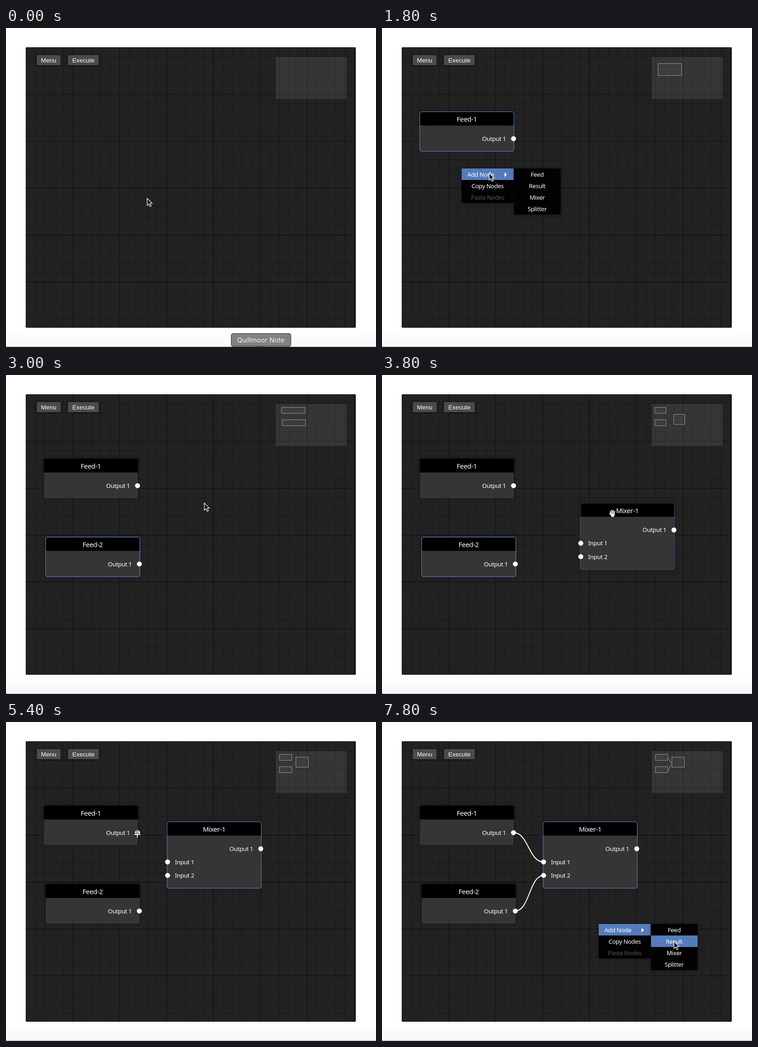
These frames come from a looping animation (806x695 px, 8 s). An HTML page with a canvas:

```html
<!DOCTYPE html>
<html lang="en">
<head>
<meta charset="utf-8">
<title>Node editor</title>
<style>
  html, body { margin: 0; width: 100%; height: 100%; overflow: hidden; background: #fff; }
  canvas { display: block; }
</style>
</head>
<body>
<canvas id="stage" width="806" height="695"></canvas>
<script>
const ctx = document.getElementById('stage').getContext('2d');
const LOOP = 8000, STEP = 200;
const UI = '"Noto Sans", "Open Sans", sans-serif';
const BLUE = '#557cba';

// Pointer position at every step
const pointer = [
  [307.5, 371], [240, 294], [174, 218], [234, 229], [335, 231], [300, 235], [256, 231], [164, 195],
  [173.5, 306], [233.5, 316], [335, 318], [256, 319], [169, 366], [230, 350], [330, 318], [432, 279],
  [492, 290], [595, 341], [595, 341], [502, 301], [465, 272], [432, 248], [421, 240], [350, 290],
  [322, 334], [304, 285], [291, 252], [286, 245], [308, 260], [335, 290], [352, 305], [345, 325],
  [310, 380], [290.5, 412], [320, 382], [352, 334], [472, 440], [472, 440], [532, 451], [636, 478]
];

// Steps at which each context menu opens, shows its submenu, reaches an item and closes
const menus = [
  { x: 174, y: 218, open: 2, sub: 3, pick: 4, close: 5, item: 0 },
  { x: 173.5, y: 306, open: 8, sub: 9, pick: 10, close: 11, item: 0 },
  { x: 432, y: 279, open: 16, sub: 16, pick: 17, close: 19, item: 2 },
  { x: 472, y: 440, open: 37, sub: 38, pick: 39, close: 40, item: 1 }
];

// Nodes appear at `from`, are dragged between `grab` and `drop`, and lose focus at `blur`
const nodes = [
  { title: 'Feed-1', from: [174.5, 218.5], to: [82.5, 182.5], born: 5, grab: 6, drop: 7, mapped: 7, blur: 12, h: 86, inputs: 0 },
  { title: 'Feed-2', from: [173.5, 306], to: [86.5, 353.2], born: 11, grab: 11, drop: 12, mapped: 13, blur: 20, h: 86, inputs: 0 },
  { title: 'Mixer-1', from: [432, 279], to: [351, 217.5], born: 19, grab: 19, drop: 22, mapped: 22, blur: 99, h: 144.5, inputs: 2 }
];
const NODE_W = 204.7;

const links = [
  { source: 0, input: 0, start: 28, end: 31 },
  { source: 1, input: 1, start: 34, end: 35 }
];

const clamp01 = v => Math.max(0, Math.min(1, v));
const outPort = ([x, y]) => [x + 204, y + 58.6];
const inPort = ([x, y], i) => [x + 1, y + 87.5 + i * 29.2];

function nodePos(node, step) {
  const raw = clamp01((step - node.grab) / (node.drop - node.grab));
  const k = raw * (2 - raw);
  return node.from.map((v, i) => v + (node.to[i] - v) * k);
}

function text(str, x, y, { size = 13.2, color = '#fff', align = 'center', family = UI, spacing = -0.4 } = {}) {
  ctx.font = `${size}px ${family}`;
  ctx.letterSpacing = `${spacing}px`;
  ctx.fillStyle = color;
  ctx.textAlign = align;
  ctx.fillText(str, x, y);
}

function box(x, y, w, h, radius, fill, stroke) {
  ctx.beginPath();
  ctx.roundRect(x, y, w, h, radius);
  if (fill) { ctx.fillStyle = fill; ctx.fill(); }
  if (stroke) { ctx.strokeStyle = stroke; ctx.stroke(); }
}

function withShadow(blur, alpha, draw) {
  ctx.save();
  ctx.shadowColor = `rgba(0,0,0,${alpha})`;
  ctx.shadowBlur = blur;
  draw();
  ctx.restore();
}

function drawBackground() {
  ctx.fillStyle = '#fff';
  ctx.fillRect(0, 0, 806, 695);
  const fade = ctx.createLinearGradient(0, 655, 0, 694);
  fade.addColorStop(0, '#fff');
  fade.addColorStop(1, '#f7f7f7');
  ctx.fillStyle = fade;
  ctx.fillRect(0, 655, 806, 39);
  ctx.fillStyle = '#a0a0a0';
  ctx.fillRect(0, 694, 806, 1);

  ctx.save();
  box(43, 42, 719, 611, 2, '#222');
  ctx.clip();
  const gap = 20.43;
  for (let k = 1; k <= 35; k++) {
    const major = k % 5 === 0;
    ctx.fillStyle = major ? '#141414' : '#181818';
    const size = major ? 1.6 : 1;
    ctx.fillRect(43.4 + k * gap - size / 2, 42, size, 611);
    ctx.fillRect(43, 42.5 + k * gap - size / 2, 719, size);
  }
  ctx.restore();
  ctx.lineWidth = 1;
  box(43.5, 42.5, 718, 610, 2, null, '#111');
}

function drawButton(label, x, w) {
  withShadow(5, 0.7, () => box(x, 59, w, 22, 3, '#4b4b4b'));
  text(label, x + w / 2, 75, { size: 13.333, family: '"Liberation Sans", Arial, sans-serif', spacing: 0 });
}

function curve(a, b) {
  const mid = (a[0] + b[0]) / 2;
  ctx.beginPath();
  ctx.moveTo(...a);
  ctx.bezierCurveTo(mid, a[1], mid, b[1], ...b);
  ctx.stroke();
}

function drawMinimap(step) {
  ctx.fillStyle = 'rgba(255,255,255,.09)';
  ctx.fillRect(588, 63, 154, 91.5);
  const shown = nodes.filter(n => step >= n.born)
    .map(n => ({ h: n.h, pos: step >= n.mapped ? n.to : n.from }));
  if (!shown.length) return;

  const left = Math.min(...shown.map(n => n.pos[0]));
  const top = Math.min(...shown.map(n => n.pos[1]));
  const spanX = Math.max(...shown.map(n => n.pos[0])) + NODE_W - left;
  const spanY = Math.max(...shown.map(n => n.pos[1] + n.h)) - top;
  const sx = 154 / (2 * spanX + 204), sy = 91.5 / (1.68 * spanY + 158);
  const project = ([x, y]) => [588 + (x - left + 50) * sx, 63 + (y - top + 46) * sy];

  ctx.lineWidth = 1;
  for (const n of shown) {
    const [x, y] = project(n.pos).map(v => Math.round(v) + 0.5);
    box(x, y, Math.round(NODE_W * sx), Math.round(n.h * sy), 0, 'rgba(255,255,255,.04)', '#969696');
  }
  ctx.strokeStyle = '#aaa';
  for (const l of links) {
    if (step >= l.end) curve(project(outPort(nodes[l.source].to)), project(inPort(nodes[2].to, l.input)));
  }
}

function drawPort([x, y]) {
  ctx.beginPath();
  ctx.arc(x, y, 5.4, 0, Math.PI * 2);
  ctx.fillStyle = '#fff';
  ctx.fill();
}

function focusLevel(node, step) {
  const gained = step - Math.max(node.grab, node.born + (node.inputs ? 0 : node.grab === node.born ? 1 : 0));
  const lost = step - node.blur;
  if (gained < 0 || lost > 0) return 0;
  return gained === 0 || lost === 0 ? 0.5 : 1;
}

function drawNode(node, step) {
  const pos = nodePos(node, step), [x, y] = pos;
  withShadow(7, 0.7, () => box(x, y, NODE_W, 30, [4, 4, 0, 0], '#000'));
  withShadow(5, 0.5, () => box(x, y + 30, NODE_W, node.h - 30, [0, 0, 4, 4], 'rgba(57,57,57,.93)'));
  const focus = focusLevel(node, step);
  if (focus) {
    ctx.lineWidth = 1.3;
    box(x - 0.2, y - 0.2, NODE_W + 0.6, node.h + 0.4, 4.5, null, `rgba(85,124,186,${focus})`);
  }
  text(node.title, x + NODE_W / 2, y + 21.5, { size: 14.8, spacing: -0.45 });
  text('Output 1', x + 187.5, y + 63.4, { align: 'right' });
  for (let i = 0; i < node.inputs; i++) {
    text(`Input ${i + 1}`, x + 17, y + 92.3 + i * 29.2, { align: 'left' });
  }
}

function drawPorts(node, step) {
  const pos = nodePos(node, step);
  drawPort(outPort(pos));
  for (let i = 0; i < node.inputs; i++) drawPort(inPort(pos, i));
}

function drawLinks(step) {
  ctx.strokeStyle = '#fff';
  ctx.lineWidth = 2;
  for (const l of links) {
    if (step < l.start) continue;
    curve(outPort(nodes[l.source].to), step < l.end ? pointer[step] : inPort(nodes[2].to, l.input));
  }
}

function drawMenu(menu, step) {
  const { x, y } = menu, row = 25.1;
  const panel = (px, w, rows) => withShadow(6, 0.6, () => {
    ctx.fillStyle = 'rgba(0,0,0,.86)';
    ctx.fillRect(px, y, w, rows * row);
  });
  const highlight = (px, w, index) => {
    ctx.fillStyle = BLUE;
    ctx.fillRect(px, y + index * row, w, row);
  };
  const label = (str, cx, index, color) => text(str, cx, y + 17.8 + index * row, { color });

  panel(x, 113.5, 3);
  if (step >= menu.sub) {
    highlight(x, 113.5, 0);
    panel(x + 114, 101.5, 4);
    if (step >= menu.pick) highlight(x + 114, 101.5, menu.item);
    ['Feed', 'Result', 'Mixer', 'Splitter'].forEach((name, i) => label(name, x + 164.5, i));
  }
  label('Add Node', x + 41.8, 0);
  label('Copy Nodes', x + 56.7, 1);
  label('Paste Nodes', x + 56.7, 2, '#555');
  ctx.fillStyle = '#fff';
  ctx.fill(new Path2D(`M${x + 93.5} ${y + 8.5}l5 5l-5 5z`));
}

function drawTooltip() {
  ctx.fillStyle = '#555';
  ctx.fill(new Path2D('M542 693h27l-7 2h-13z'));
  ctx.lineWidth = 1.3;
  box(490.7, 665.7, 129.8, 27.8, 4, '#828282', '#414141');
  text('Quillmoor Note', 555, 685, { size: 14.6, color: '#f2f2f2', family: 'Inter, sans-serif', spacing: 0 });
}

const arrowShape = new Path2D('M0 0V15.5L3.6 12.2L6 18L8.7 16.9L6.3 11.2H11Z');
const crossShape = new Path2D('M-1.5 -7h3v5.5h6v3h-6v6h-3v-6h-6v-3h6z');
const palmShape = new Path2D('M-4 -1L4.5 -1L4.5 3L2.5 8H-1.5L-4.5 3Z');
const fingerShape = new Path2D('M-3.2 0L-4.3 -4.2M-.8 -1L-1.3 -6.2M1.7 -1L2 -6M4 0L5 -4M-3.5 3L-5.8 .3');

function drawHand() {
  ctx.lineCap = ctx.lineJoin = 'round';
  for (const [color, width] of [['#000', 3.8], ['#fff', 2]]) {
    ctx.strokeStyle = ctx.fillStyle = color;
    ctx.lineWidth = width;
    ctx.stroke(fingerShape);
    ctx.lineWidth = width - 1;
    ctx.stroke(palmShape);
    ctx.fill(palmShape);
  }
  ctx.strokeStyle = '#222';
  ctx.lineWidth = 0.7;
  ctx.stroke(new Path2D('M-1.9 -2V2M.5 -2V2M2.9 -2V2'));
}

function drawPointer(step) {
  const dragging = nodes.some(n => step >= n.grab && step <= n.drop);
  const connecting = (step >= 27 && step <= 30) || (step >= 33 && step <= 35);
  ctx.save();
  ctx.translate(...pointer[step]);
  if (dragging) {
    drawHand();
  } else {
    const shape = connecting ? crossShape : arrowShape;
    ctx.fillStyle = connecting ? '#fff' : '#111';
    ctx.strokeStyle = connecting ? '#222' : '#fff';
    ctx.lineWidth = 1.2;
    ctx.fill(shape);
    ctx.stroke(shape);
  }
  ctx.restore();
}

function render(step) {
  drawBackground();
  drawButton('Menu', 67, 52);
  drawButton('Execute', 135, 67);
  drawMinimap(step);
  const shown = nodes.filter(n => step >= n.born);
  shown.forEach(n => drawNode(n, step));
  drawLinks(step);
  shown.forEach(n => drawPorts(n, step));
  menus.filter(m => step >= m.open && step < m.close).forEach(m => drawMenu(m, step));
  if (step === 0) drawTooltip();
  drawPointer(step);
}

const startTime = performance.now();
function tick() {
  render(Math.floor(((performance.now() - startTime) % LOOP) / STEP));
  requestAnimationFrame(tick);
}
tick();
</script>
</body>
</html>
```
